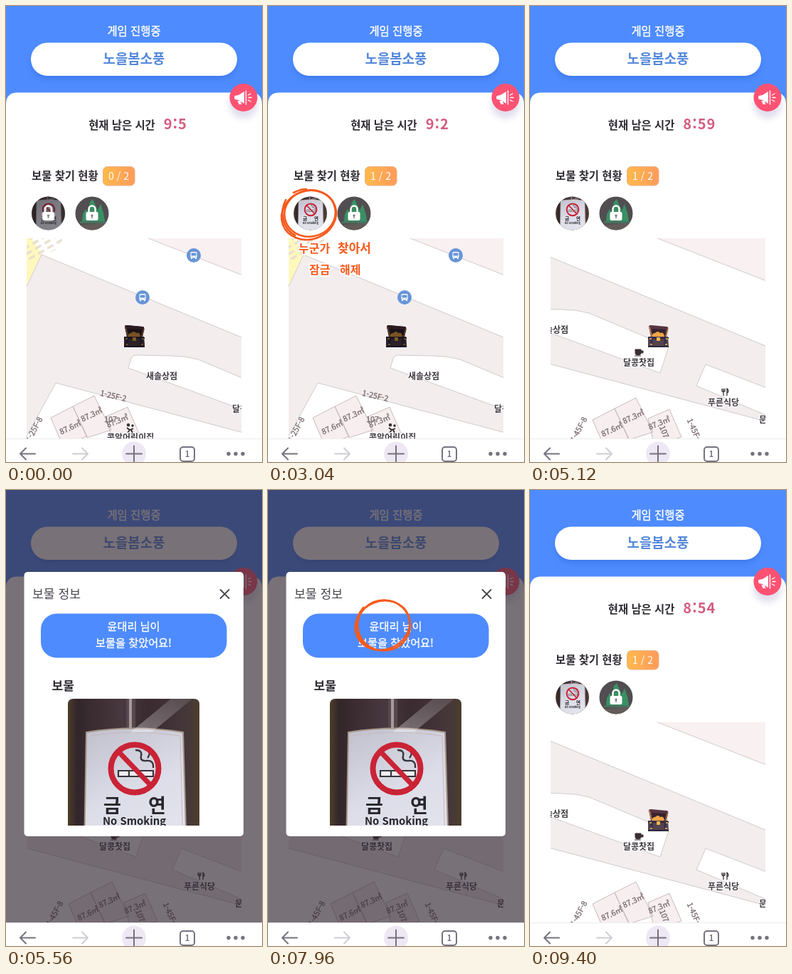
An HTML page for the animation above (9440 ms loop, 360 by 640 pixels).

```html
<!DOCTYPE html>
<html lang="ko">
<head>
<meta charset="utf-8">
<title>보물 찾기</title>
<style>
html, body { margin: 0; width: 100%; height: 100%; overflow: hidden; background: #fff; }
svg.stage { display: block; width: 100vw; height: 100vh; }
text, .timer { font-family: "Noto Sans CJK KR", "Noto Sans", sans-serif; }
.mid { text-anchor: middle; }
.bold { font-weight: 700; }
.semi { fill: #fff; stroke: #fff; stroke-width: .35px; }
.edge { stroke: #c8bec1; stroke-width: .8; }
.place { font-size: 12px; font-weight: 700; fill: #403a42; stroke: #fff; stroke-width: 2px; paint-order: stroke; }
.lot { font-size: 10.8px; fill: #736368; stroke: #736368; stroke-width: .25px; text-anchor: middle; }
.icon { fill: none; stroke-width: 2; stroke-linecap: round; stroke-linejoin: round; }
.pen { fill: none; stroke: #f65a1c; stroke-linecap: round; stroke-linejoin: round; }
.hand { font-size: 16px; fill: #f65a1c; stroke: #fff; stroke-width: 4px; paint-order: stroke; stroke-opacity: .8; font-weight: 700; }

.timer { display: flex; justify-content: center; align-items: baseline; gap: 12px; height: 30px;
  font-size: 15.4px; font-weight: 700; line-height: 30px; color: #302b34; white-space: nowrap; }
.timer::after { content: "9:5"; font-size: 20px; letter-spacing: 1px; color: #d45c7e;
  animation: tick 9440ms step-end infinite; }

.locked, .found, .note1, .note2 { animation: 9440ms step-end infinite; }
.locked { animation-name: locked; }
.found { animation-name: found; }
.note1 { animation-name: note1; }
.note2 { animation-name: note2; }
.corner, .moved, .shade, .modal { animation: 9440ms linear infinite; }
.corner { animation-name: corner; }
.moved { animation-name: moved; }
.shade { animation-name: shade; }
.modal { animation-name: modal; }

@keyframes tick {
  0% { content: "9:5"; }
  8.05% { content: "9:4"; }
  17.37% { content: "9:3"; }
  26.7% { content: "9:2"; }
  36.02% { content: "9:1"; }
  45.76% { content: "9:0"; }
  53.8% { content: "8:59"; }
  86% { content: "8:55"; }
  96.6%, 100% { content: "8:54"; }
}
@keyframes locked { 0% { opacity: 1; } 6.36%, 100% { opacity: 0; } }
@keyframes found { 0% { opacity: 0; } 6.36%, 100% { opacity: 1; } }
@keyframes note1 { 0% { opacity: 0; } 10.59% { opacity: 1; } 41.1%, 100% { opacity: 0; } }
@keyframes note2 { 0% { opacity: 0; } 67.8% { opacity: 1; } 91%, 100% { opacity: 0; } }
@keyframes corner { 0%, 45.76% { opacity: 0; } 47.46%, 100% { opacity: 1; } }
@keyframes moved { 0%, 47.46% { opacity: 0; } 49.15%, 100% { opacity: 1; } }
@keyframes shade { 0%, 45.76% { opacity: 1; } 47.46%, 100% { opacity: 0; } }
@keyframes modal { 0%, 55.93% { opacity: 0; } 57.2%, 89.83% { opacity: 1; } 91.1%, 100% { opacity: 0; } }
</style>
</head>
<body>
<svg class="stage" viewBox="0 0 360 640" preserveAspectRatio="none">
  <defs>
    <linearGradient id="badge"><stop stop-color="#ffba4c"/><stop offset="1" stop-color="#ff9a5c"/></linearGradient>
    <linearGradient id="wood">
      <stop stop-color="#5a4a28"/><stop offset=".1" stop-color="#33262a"/><stop offset=".42" stop-color="#48383f"/>
      <stop offset=".6" stop-color="#3a2b31"/><stop offset=".88" stop-color="#46373b"/><stop offset="1" stop-color="#4f4224"/>
    </linearGradient>
    <linearGradient id="plate" x2=".4" y2="1"><stop stop-color="#bfc0cc"/><stop offset=".6" stop-color="#dcdde8"/><stop offset="1" stop-color="#e2e3ec"/></linearGradient>
    <linearGradient id="glare" x1="1" x2="0" y2="1"><stop stop-color="#fff" stop-opacity=".1"/><stop offset="1" stop-color="#fff" stop-opacity=".35"/></linearGradient>
    <filter id="soft" x="-30%" y="-50%" width="160%" height="200%"><feGaussianBlur stdDeviation="4"/></filter>
    <pattern id="dashes" width="15" height="8" patternUnits="userSpaceOnUse" patternTransform="rotate(-30)">
      <rect y="2" width="10" height="3.6" rx="1.6" fill="#eadfcf"/>
    </pattern>
    <clipPath id="mapClip"><rect x="29" y="326" width="302" height="282"/></clipPath>
    <clipPath id="cornerClip"><rect x="188" y="326" width="143" height="115"/></clipPath>
    <clipPath id="photoClip"><path d="M87 471V301q0-8 8-8h169q8 0 8 8v170z"/></clipPath>
    <clipPath id="thumb1"><circle cx="59.5" cy="291" r="23.5"/></clipPath>
    <clipPath id="thumb2"><circle cx="121" cy="291" r="23.5"/></clipPath>

    <g id="bus">
      <circle r="10" fill="#6895d8"/>
      <rect x="-4.5" y="-5" width="9" height="8.5" rx="1.5" fill="#fff"/>
      <path d="M-3 3v2M3 3v2" stroke="#fff" stroke-width="2"/>
      <path d="M-3-3H3V0H-3zM-3 2h1M2 2h1" fill="#6895d8" stroke="#6895d8"/>
    </g>

    <g id="block">
      <path fill="#f6eeef" stroke="#c5b4b7" stroke-width=".9" d="M63 578 94 562 114 604 80 617zM94 562 124 547 148 595 114 606zM141 576 171 563 188 602 150 614z"/>
      <text class="lot" transform="translate(92 595) rotate(-25)">87.6㎡</text>
      <text class="lot" transform="translate(122 577) rotate(-25)">87.3㎡</text>
      <text class="lot" transform="translate(158 586) rotate(-22)">87.3㎡</text>
    </g>

    <g id="world">
      <rect x="20" y="320" width="510" height="360" fill="#fff"/>
      <path class="edge" d="M200 326 530 455V310H200z" fill="#f9f0f1"/>
      <path d="M20 326H36L50 348 20 412z" fill="#fff8bd"/>
      <path d="M29 326H80L74 340 46 354 29 358z" fill="url(#dashes)"/>
      <path class="edge" d="M50 349 530 547V700H-20V498z" fill="#f3edee"/>
      <path class="edge" d="M182 490 232 491Q252 491 270 496L332 522 382 543 370 580 172 508 176 495Q178 490 182 490z" fill="#fff"/>
      <path class="edge" d="M434 568 530 605V644L421 598z" fill="#fff"/>
      <path class="edge" d="M70 529 530 651V730H-40z" fill="#fff"/>
      <use href="#bus" x="264" y="350"/>
      <use href="#bus" x="192" y="409"/>
      <use href="#block"/>
      <use href="#block" x="212" y="68"/>
      <text class="lot" transform="translate(150 551) rotate(13)">1-25F-2</text>
      <text class="lot" transform="translate(43 596) rotate(-62)">1-25F-8</text>
      <text class="lot" transform="translate(259 661) rotate(-62)">1-45F-8</text>
      <text class="lot" transform="translate(415 663) rotate(66)">1-45F-2</text>
      <text class="lot" x="147" y="584">107</text>
      <text class="lot" transform="translate(372 664) rotate(68)">107</text>
      <g fill="none" stroke="#2b2729" stroke-width="1.8">
        <circle cx="172" cy="588" r="1.3"/><path d="M170 592l4 3 5-2M174 595l-3 4M176 595l2 4"/>
        <circle cx="178" cy="589" r=".8"/>
      </g>
      <text class="place" x="142" y="610">콩알어린이집</text>
      <text class="place" x="197" y="523.5">새솔상점</text>
      <text class="place" x="318" y="569.5">달콩찻집</text>
      <text class="place" x="437" y="625.5">푸른식당</text>
      <text class="place" x="509" y="650">문구점</text>
      <path d="M335 547h8v5q0 3-4 3t-4-3zM343 549h3v3h-3M334 556h9" fill="#3a3032" stroke="#3a3032"/>
      <path d="M457 602v4M459 602v4M461 602v4M457 606h4M459 606v6M464 612v-10q3 2 1 6" fill="none" stroke="#3a3032" stroke-width="1.3"/>
    </g>

    <g id="photo">
      <rect x="80" y="285" width="200" height="230" fill="url(#wood)"/>
      <path d="M169 290h13v45h-13z" fill="#57484d"/>
      <path d="M175 290v45" stroke="#a69a9d" stroke-width="4"/>
      <path d="M113 340Q180 329 249 340L254 510H110z" fill="url(#plate)" stroke="#a79787" stroke-width="2"/>
      <path d="M118 345Q180 335 245 345L249 505" fill="none" stroke="#c9b8bd"/>
      <path d="M232 293h30L205 340h-30z" fill="url(#glare)"/>
      <path d="M158 394h49v8h-49zM173 394v8" fill="#f0eef2" stroke="#37343c" stroke-width="2.2"/>
      <path d="M207 390q1-11-9-10-10 1-8-7t-8-8M199 376q7-9-4-12" fill="none" stroke="#37343c" stroke-width="2.4"/>
      <circle cx="181" cy="391" r="33.5" fill="none" stroke="#ca2336" stroke-width="8"/>
      <path d="M158 367 204 415" stroke="#ca2336" stroke-width="7"/>
      <g class="bold" fill="#29262c">
        <text x="137" y="453" font-size="27">금</text><text x="200" y="453" font-size="27">연</text>
        <text x="136" y="470" font-size="14.8">No Smoking</text>
      </g>
    </g>

    <g id="lock">
      <path d="M-4.5-1V-6a4.5 4.5 0 0 1 9 0v5" fill="none" stroke="#fff" stroke-width="2.5"/>
      <rect x="-8.5" y="-2" width="17" height="12" rx="2" fill="#fff"/>
      <circle cy="3" r="1.6" fill="#777"/><path d="M0 3v4" stroke="#777" stroke-width="1.4"/>
    </g>

    <g id="chest">
      <path d="M167 450q0-2 3-2l22 2q3 0 2 4l-2 10H170z" fill="#553544"/>
      <path d="M171 453l20 1-2 10H173z" fill="#35232f"/>
      <path d="M171 464q1-5 5-5 4-4 7 0 5-2 6 5z" fill="#f0a547"/>
      <path d="M168 450l3 13M194 453l-3 11" stroke="#b67b48" stroke-width="1.5"/>
      <path d="M166 464h28l1 15h-29z" fill="#54424f"/>
      <path d="M166 466h29M166 478h29" stroke="#2d293a" stroke-width="2"/>
      <path d="M171 464v15M190 464v15" stroke="#33304a" stroke-width="3"/>
      <rect x="178" y="465" width="5" height="5" rx="1" fill="#f4b44d"/>
      <path d="M168 467h3M191 467h3M169 475h3M190 475h3" stroke="#d29a4c" stroke-width="2"/>
    </g>
  </defs>

  <!-- page -->
  <rect width="360" height="640" fill="#4e8bff"/>
  <path d="M0 640V138Q0 121.500 16 121.500H344Q360 121.500 360 138V640z" fill="#fff"/>
  <text class="mid semi" x="180" y="40.700" font-size="15.400">게임 진행중</text>
  <rect x="37" y="57" width="286" height="45" rx="22" fill="#245ec9" opacity=".4" filter="url(#soft)"/>
  <rect x="35" y="51.500" width="290" height="46.500" rx="23.200" fill="#fff"/>
  <text class="mid bold" x="180" y="80.500" font-size="18.900" fill="#5488da">노을봄소풍</text>

  <circle cx="334" cy="138" r="20" fill="#7a6fae" opacity=".22" filter="url(#soft)"/>
  <circle cx="334" cy="128.500" r="19.500" fill="#ff5273"/>
  <path d="M322 126l5-1 8-5v17l-8-5-5-1q-2-3 0-5zM325.500 133h4l2 5h-4z" fill="#fff"/>
  <path d="M337.500 119v19M340.500 125l3.500-2M341 128.500h4M340.500 132l3.500 2" class="icon" stroke="#fff" style="stroke-width:1.400"/>

  <foreignObject x="85.500" y="150" width="200" height="32">
    <div xmlns="http://www.w3.org/1999/xhtml" class="timer">현재 남은 시간</div>
  </foreignObject>

  <text class="bold" x="36" y="243.500" font-size="15.400" fill="#302b34">보물 찾기 현황</text>
  <rect x="136.500" y="225.500" width="44.500" height="26.500" rx="6" fill="url(#badge)" stroke="#e8b183"/>
  <g class="mid" font-size="14" fill="#fff">
    <text class="locked" x="158.500" y="243.500">0 / 2</text>
    <text class="found" x="158.500" y="243.500">1 / 2</text>
  </g>

  <g clip-path="url(#thumb1)">
    <use href="#photo" transform="translate(14.750 188) scale(.25)"/>
    <rect class="locked" x="36" y="267" width="48" height="48" fill="#242027" fill-opacity=".5"/>
  </g>
  <use class="locked" href="#lock" x="59.500" y="291"/>
  <g clip-path="url(#thumb2)">
    <rect x="97" y="267" width="49" height="49" fill="#514d51"/>
    <path d="M97 308l49-4v14H97z" fill="#625b58"/>
    <path d="M107 302l1-10 4-7 3 4 3-14 4-4 4 9 3 7 4-9 4 12 2 12z" fill="#3a8f64"/>
    <path d="M104 302h36v3h-36z" fill="#48735f"/>
  </g>
  <use href="#lock" x="121" y="291"/>

  <g clip-path="url(#mapClip)">
    <use href="#world"/>
    <g class="corner" clip-path="url(#cornerClip)"><use href="#world" x="-187" y="-65"/></g>
    <use class="moved" href="#world" x="-187" y="-65"/>
    <use href="#chest"/>
    <g class="shade"><use href="#chest" style="filter:brightness(.5)"/></g>
  </g>

  <g class="note1">
    <g class="pen" stroke-width="2.600">
      <ellipse cx="59" cy="291" rx="36" ry="32.500" transform="rotate(-12 59 291)"/>
      <ellipse cx="57.500" cy="293.500" rx="39" ry="34" transform="rotate(-20 57.500 293.500)"/>
      <path d="M25 272C16 289 20 312 38 322M36 262q9-5 18-5"/>
    </g>
    <g class="hand">
      <text x="43" y="346">누군가</text><text x="98" y="346" font-size="17">찾아서</text>
      <text x="58" y="376">잠금</text><text x="101" y="376">해제</text>
    </g>
  </g>

  <!-- treasure dialog -->
  <g class="modal">
    <rect width="360" height="640" fill="#322832" opacity=".66"/>
    <rect x="25.500" y="115" width="308.500" height="371" rx="5" fill="#fff"/>
    <text x="37" y="152" font-size="17.200" fill="#4a464e">보물 정보</text>
    <path class="icon" d="M301.500 140l12 12M313.500 140l-12 12" stroke="#48444c" style="stroke-width:1.800"/>
    <rect x="49" y="173.500" width="261.500" height="62" rx="22" fill="#4e8bff"/>
    <g class="mid semi" font-size="15.200">
      <text x="179.500" y="197">윤대리 님이</text>
      <text x="179.500" y="220">보물을 찾았어요!</text>
    </g>
    <text class="bold" x="64.500" y="281" font-size="17" fill="#302b34">보물</text>
    <g clip-path="url(#photoClip)"><use href="#photo"/></g>
    <g class="note2"><g class="pen" stroke-width="2.600">
      <ellipse cx="161" cy="190" rx="39" ry="34" transform="rotate(-22 161 190)"/>
      <ellipse cx="163" cy="190" rx="37" ry="35.500"/>
      <path d="M134 165C121 180 122 207 139 219"/>
    </g></g>
  </g>

  <!-- browser bar -->
  <rect y="607" width="360" height="33" fill="#fff"/>
  <path d="M0 607.500H360" stroke="#eeecef"/>
  <circle cx="180" cy="628.500" r="17" fill="#eee8f4"/>
  <g class="icon" stroke="#77717f">
    <path d="M41 628.500H20M28 620.500l-8 8 8 8"/>
    <path d="M94 628.500h21M107 620.500l8 8-8 8" stroke="#d0ccd4"/>
    <path d="M169 628.500h22M180 617.500v22"/>
    <rect x="245" y="619" width="20" height="20" rx="4"/>
  </g>
  <text class="mid bold" x="255" y="633" font-size="11" fill="#77717f">1</text>
  <g fill="#77717f"><circle cx="313" cy="628.500" r="2.700"/><circle cx="323" cy="628.500" r="2.700"/><circle cx="333" cy="628.500" r="2.700"/></g>
</svg>
</body>
</html>
```
